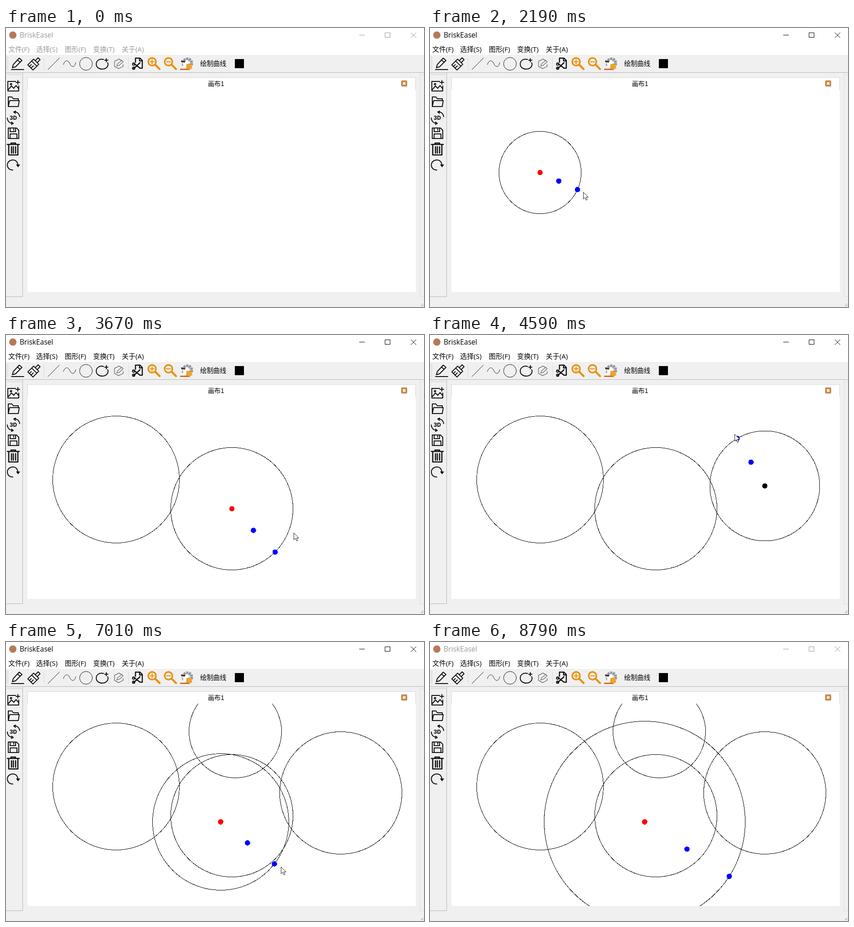
Recreate the animation shown at these times as an HTML page. Size 917 by 611 pixels, loop 8880 ms.

```html
<!DOCTYPE html>
<html lang="zh-CN">
<head>
<meta charset="utf-8">
<title>BriskEasel</title>
<style>
html, body { margin: 0; width: 100%; height: 100%; overflow: hidden; background: #f0f0f0; }
svg { display: block; width: 100vw; height: 100vh; }
text { font: 15px "Open Sans", "Noto Sans CJK SC", "Noto Sans CJK", sans-serif; }
.small { font: 14.3px "Liberation Sans", "Noto Sans CJK SC", "Noto Sans CJK", sans-serif; }
.icon { fill: none; stroke: #111; stroke-width: 2; stroke-linejoin: round; stroke-linecap: round; }
.thin { stroke-width: 1; }
.zoom { stroke: #e8920c; stroke-width: 3.4; }
.mark { stroke-width: 2.2; }
.crisp, #art circle { shape-rendering: crispEdges; }
</style>
</head>
<body>
<svg viewBox="0 0 917 611">
  <clipPath id="page"><path d="M47 135H899V578H47Z"/></clipPath>

  <!-- window frame -->
  <g class="crisp">
    <path fill="#f0f0f0" d="M0 0H917V611H0Z"/>
    <path fill="#fff" d="M0 0H917V59H0ZM47 108H899V578H47Z"/>
    <path fill="none" stroke="#b4b4b4" d="M0 97.5H917M36.5 98V588.5H0"/>
    <path fill="none" stroke="#dcdcdc" d="M908.5 98V588.5H917"/>
    <path fill="none" stroke="#d9d9d9" d="M47.5 135V108.5H898.5V135M83.5 65V92M268.5 65V92"/>
    <path fill="none" stroke="#aaa" stroke-dasharray="1 2" d="M2.5 63V93M4.5 64V93M2 100.5H35M3 102.5H35M913 102.5H917"/>
    <path fill="#aaa" d="M913 604h2v2h-2zM910 607h2v2h-2zM913 607h2v2h-2z"/>
    <path d="M502 68h20v20h-20z"/>
  </g>
  <circle cx="15" cy="15.5" r="8" fill="#b8795a"/>
  <g id="bar">
    <text x="30" y="21" style="font-size:15.6px">BriskEasel</text>
    <path class="crisp" fill="none" stroke="currentColor" d="M775 15.5H787M831.5 10.5h11v10h-11z"/>
    <path fill="none" stroke="currentColor" d="M888 10L900 21.5M900 10L888 21.5"/>
  </g>
  <g id="menu">
    <text x="5" y="52">文件(F)</text><text x="66" y="52">选择(S)</text>
    <text x="129" y="52">图形(F)</text><text x="191" y="52">变换(T)</text>
    <text x="254" y="52">关于(A)</text>
  </g>
  <text class="small" x="426" y="83">绘制曲线</text>
  <text class="small" x="443" y="127" style="font-size:14px">画布1</text>
  <rect x="867.5" y="115.5" width="12" height="12" rx="1" fill="#cf914e" stroke="#a36a32"/>
  <path stroke="#fff" stroke-width="2" d="M871 119l5 5M876 119l-5 5"/>

  <!-- top tools -->
  <g class="icon">
    <path d="M12 91H39M14 87l2-7L29 66l6 5L21 85ZM25 70l6 5"/>
    <path transform="translate(62 78) rotate(45)" d="M-3-6V-15H3V-6M-8-6H8V12H-8ZM-8 0H8M-3 12V6M2 12V5"/>
    <path class="thin" d="M92 91L117 66M126 80c3-10 10-11 14-2s11 8 13-2"/>
    <circle class="thin" cx="175.500" cy="78.500" r="14"/>
    <path d="M214 69C205 66 198 72 198 79C198 86 204 90 211 90C219 90 224 85 224 79L223 76M220 67v7M216.500 70.500h7"/>
    <path stroke="#777" stroke-width="1.500" d="M255 72L248 68L238 73V84L247 89L257 84V80M243 83l2-5 9-7 3 3-9 8Z"/>
    <path stroke-width="2.400" d="M284 75V66h10l5 5v17h-5M293 66v6h6M280 77L294 88M280 89L294 76"/>
    <circle cx="280" cy="79" r="2.500"/><circle cx="280" cy="88" r="2.500"/>
    <g id="lens" class="zoom">
      <circle cx="320.500" cy="74" r="8.500"/>
      <path stroke-width="4.500" d="M328 81L337 90"/>
      <path class="mark" d="M316 74h9"/>
    </g>
    <use href="#lens" x="36"/>
    <path class="zoom mark" d="M320.500 69.500v9"/>
  </g>
  <circle cx="398" cy="77" r="10" fill="#b4bcc4" stroke="#8d97a3" stroke-width="5" stroke-dasharray="4.500 1.800"/>
  <path fill="#fff" d="M388 73l9-3 7 6-5 12h-10z"/>
  <path fill="#efa329" d="M396 79l9-2 4 11-7 3-7-3z"/>
  <path fill="#4a3526" d="M384 71l10 1-2 4-8-2z"/>
  <path fill="#d56b2d" d="M382 89h18l4 3h-22z"/>

  <!-- side tools -->
  <g class="icon">
    <path d="M21 117H4V138H28V127M26 115v8M22 119h8M5 135l7-8 5 5 5-6 6 7"/>
    <circle cx="11" cy="123" r="1.500"/>
    <path d="M5 172V151h8l3 4h11v4M5 172l3-13h21l-2 13Z"/>
    <path d="M17 184c7-1 12 3 13 10M17 184l4-2M17 184l4 3M3 197c0 7 5 12 13 12M16 209l-4-3M16 209l-4 2"/>
    <path d="M5 219h18l5 5v18H5ZM9 219v8h12v-8M17 221v3M9 242v-10h15v10"/>
    <path stroke-width="2.600" d="M3 255H29M11 254v-2h10v2M6 256v22h20v-22M12 260v14M16 260v14M21 260v14"/>
    <path d="M15 311C7 311 3 306 3 300C3 293 9 289 15 289C22 289 26 294 26 301"/>
  </g>
  <path d="M22 299h9l-4.500 6z"/>
  <text x="8" y="201" style="font:bold 13px Roboto,sans-serif">3D</text>

  <g id="art" clip-path="url(#page)"></g>
  <path id="cursor" fill="#fff" stroke="#222" d="M.5 .5V15.500L4 12.200L6.500 18L9 17L6.500 11.500H11.300Z"/>
</svg>
<script>
const LOOP = 8880, STEP = 77.6, WAKE = 1720, SLEEP = 8790, EXIT = 8330;
const ENTRY = [781, 587];

// The pointer travels to "at", presses there and drags to "to"; bend bows the drag sideways.
const strokes = [
  { leave: 310, arrive: 1600, press: 1706, release: 2480, at: [241.5, 316.5], to: [368, 374.1] },
  { leave: 2675, arrive: 2930, press: 3110, release: 3500, at: [495.5, 380.5], to: [590.3, 475.3] },
  { leave: 3576, arrive: 3960, press: 4040, release: 4637, at: [734.5, 330.5], to: [667, 214.7], hub: '#000' },
  { leave: 4930, arrive: 5300, press: 5380, release: 5770, at: [503, 196], to: [528.5, 294.2] },
  { leave: 6000, arrive: 6200, press: 6388, release: 7418, at: [471, 394], to: [656.5, 513.2], bend: 16 },
  { leave: 7870, arrive: EXIT, press: Infinity, at: [831, 587] }
];

const $ = id => document.getElementById(id);
const mix = (a, b, k) => a.map((v, i) => v + (b[i] - v) * k);

function progress(t, start, end) {
  const k = Math.min(1, Math.max(0, (t - start) / (end - start)));
  return 1 - (1 - k) ** 1.5;
}

function drag({ press, release, at, to, bend = 0 }, t) {
  const k = progress(t, press, release);
  const dx = to[0] - at[0], dy = to[1] - at[1];
  const bow = bend * Math.sin(Math.PI * k) / Math.hypot(dx, dy);
  const [x, y] = mix(at, to, k);
  return [x - dy * bow, y + dx * bow];
}

function pointer(t, i) {
  const s = strokes[i];
  if (t >= s.press) return drag(s, t);
  const from = i ? strokes[i - 1].to : ENTRY;
  return mix(from, s.at, progress(t, s.leave, s.arrive));
}

const dot = ([x, y], color) => `<circle cx="${x}" cy="${y}" r="5.8" fill="${color}"/>`;

// The circle follows the pointer one step late; only the newest shows its handles.
function drawCircle(s, t, newest) {
  const { at, hub = '#f00' } = s, handle = drag(s, t - STEP);
  const r = Math.hypot(handle[0] - at[0], handle[1] - at[1]);
  const ring = `<circle cx="${at[0]}" cy="${at[1]}" r="${r}" fill="none" stroke="#000"/>`;
  if (!newest) return ring;
  return ring + dot(at, hub) + dot(mix(at, handle, 0.5), '#00f') + dot(handle, '#00f');
}

function paint(id, active) {
  $(id).style.color = $(id).style.fill = active ? '#000' : '#999';
}

function frame(now) {
  const time = now % LOOP;
  const i = Math.max(0, strokes.filter(s => s.leave <= time).length - 1);
  const { leave } = strokes[i];
  const t = leave + Math.floor((time - leave) / STEP) * STEP;

  paint('bar', time >= WAKE && time < SLEEP);
  paint('menu', time >= WAKE);

  const drawn = strokes.filter(s => s.press <= t);
  $('art').innerHTML = drawn.map((s, n) => drawCircle(s, t, n === drawn.length - 1)).join('');

  const [x, y] = pointer(t, i).map(Math.floor);
  $('cursor').setAttribute('transform', `translate(${x} ${y})`);
  $('cursor').style.display = time >= strokes[0].leave && time < EXIT ? '' : 'none';
  requestAnimationFrame(frame);
}
requestAnimationFrame(frame);
</script>
</body>
</html>
```
